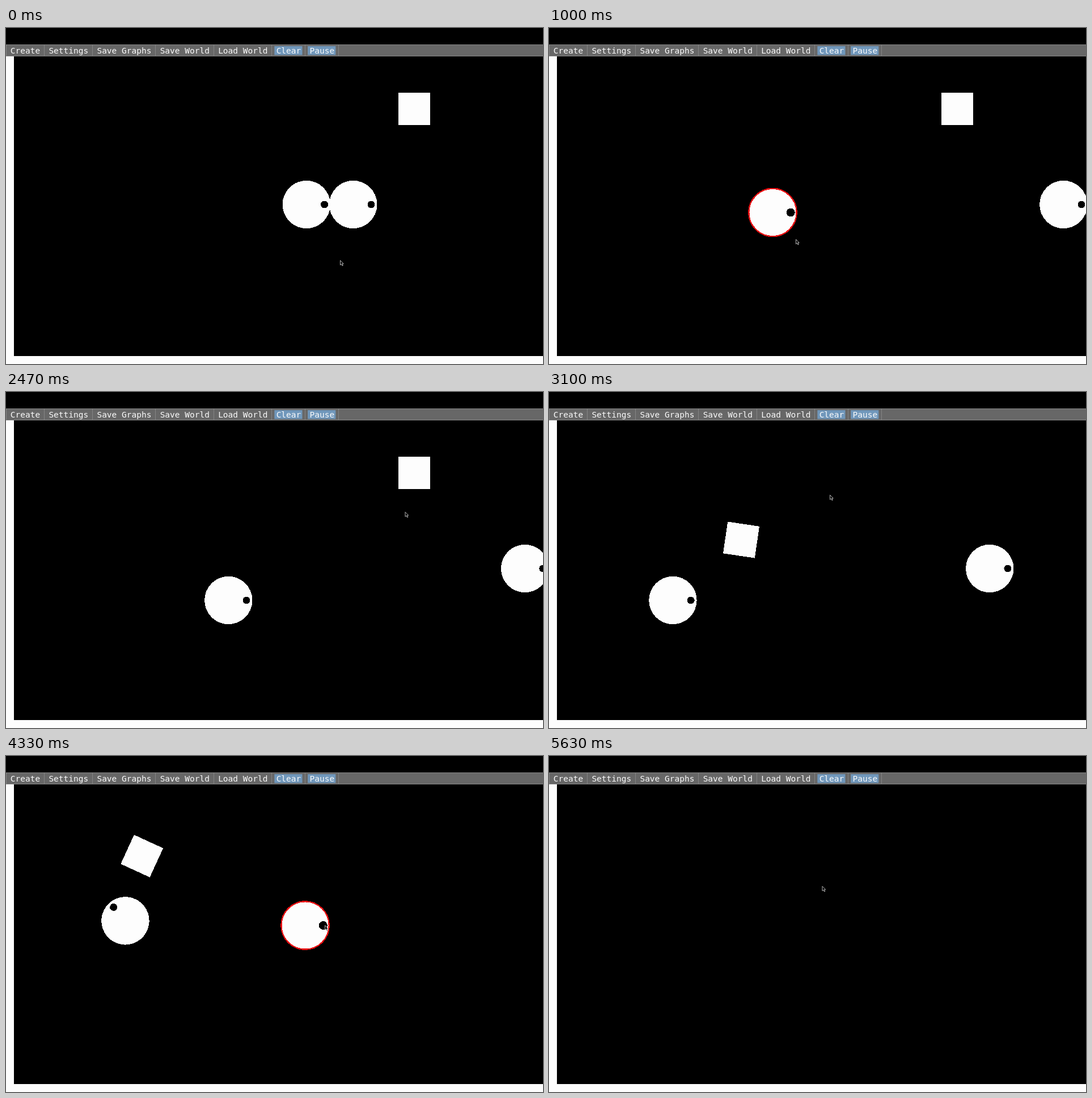
Write an HTML page that moves like this. It is 947 px wide and 592 px high and loops after 5.66 s.

```html
<!DOCTYPE html>
<html lang="en">
<head>
<meta charset="utf-8">
<title>Physics sandbox</title>
<style>
  html, body { margin: 0; width: 100%; height: 100%; overflow: hidden; background: #000; }
  svg { display: block; width: 947px; height: 592px; }
  .wall, .body { fill: #fdfdfd; shape-rendering: crispEdges; }
  .pupil { fill: #000; }
  .bar { fill: #676767; }
  .line { stroke: #858585; shape-rendering: crispEdges; }
  .button { fill: #7097bb; }
  text { font: 14.5px "DejaVu Sans Mono", monospace; fill: #fafafa; }
  .held .shape { stroke: #e80f12; stroke-width: 2.4; }
  .held .pupil { r: 7.5px; }
  .cursor { fill: #000; stroke: #c4c4c4; stroke-width: .9; }
</style>
</head>
<body>
<svg viewBox="0 0 947 592">
  <path class="wall" d="M0 50H14V578H947V592H0Z"/>
  <g id="world">
    <g id="left" class="body">
      <circle class="shape" r="42.2"/><circle class="pupil" cx="31.7" r="6.5"/>
    </g>
    <g id="right" class="body">
      <circle class="shape" r="42.2"/><circle class="pupil" cx="31.7" r="6.5"/>
    </g>
    <g id="box" class="body"><rect class="shape" x="-28.2" y="-28.2" width="56.4" height="56.4"/></g>
  </g>
  <g id="menu">
    <rect class="bar" y="29" width="947" height="21"/>
    <path class="line" d="M0 29.5H947M0 49.5H947M.5 30V49"/>
  </g>
  <path id="cursor" class="cursor" d="M.5 .5V8.6L2.5 6.9L4 10L5.3 9.4L3.9 6.3H6.2Z"/>
</svg>
<script>
const LOOP = 5660, CLEARED = 5060;
const ROOM = { left: 14, top: 50, right: 1138.5, bottom: 578 };
const RESTITUTION = .742;
const $ = id => document.getElementById(id);

function add(parent, tag, attrs, text = '') {
  const el = document.createElementNS('http://www.w3.org/2000/svg', tag);
  for (const key in attrs) el.setAttribute(key, attrs[key]);
  el.textContent = text;
  parent.append(el);
}

function buildMenu() {
  const labels = ['Create', 'Settings', 'Save Graphs', 'Save World', 'Load World', 'Clear', 'Pause'];
  let x = 0;
  for (const label of labels) {
    const width = label.length * 8.73;
    if (label === 'Clear' || label === 'Pause')
      add($('menu'), 'rect', { class: 'button', x: x + 4.5, y: 32, width: width + 5.5, height: 15.5 });
    add($('menu'), 'text', { x: x + 7.8, y: 45 }, label);
    x += width + 15.2;
    add($('menu'), 'path', { class: 'line', d: `M${Math.floor(x) + .5} 30V49` });
  }
}

// Straight flight between two walls, losing speed at each impact.
function bounce(p, v, dt, lo, hi) {
  if (!v) return p;
  const wall = v > 0 ? hi : lo, hit = (wall - p) / v;
  return dt <= hit ? p + v * dt : bounce(wall, -v * RESTITUTION, dt - hit, lo, hi);
}

const curve = (a, b, c, u) => a * (1 - u) ** 2 + 2 * b * u * (1 - u) + c * u * u;

const fly = (until, vx, vy, spin = 0) => ({
  until,
  move: ({ x, y, angle }, dt, span, r) => ({
    x: bounce(x, vx, dt, ROOM.left + r, ROOM.right - r),
    y: bounce(y, vy, dt, ROOM.top + r, ROOM.bottom - r),
    angle: angle + spin * dt
  })
});

const drag = (until, [bx, by], [cx, cy], spin = 0) => ({
  until, held: true,
  move: ({ x, y, angle }, dt, span) => ({
    x: curve(x, bx, cx, dt / span),
    y: curve(y, by, cy, dt / span),
    angle: angle + spin * dt
  })
});

// Each leg starts where the one before it ended.
const bodies = [
  { el: $('left'), r: 42, x: 530, y: 311, legs: [
    fly(800, -.1625, 0),
    drag(1470, [370, 328], [478.5, 387]),
    drag(2000, [595, 367], [522.3, 367]),
    fly(3200, -.276, 0),
    fly(3530, -.605, .241, .517),
    fly(4700, .133, .525, .073),
    fly(LOOP, -.05, .2, .073)] },
  { el: $('right'), r: 42, x: 612, y: 311, legs: [
    fly(4210, .295, 0),
    drag(LOOP, [480, 230], [740, 295])] },
  { el: $('box'), r: 38, x: 719.8, y: 142.3, legs: [
    fly(2600, 0, 0),
    drag(2940, [700, 165], [500, 172], .0168),
    fly(3200, -1, .55, .0168),
    fly(3530, -.3115, .189, .0168),
    fly(4700, .128, -.251, .0113),
    fly(LOOP, .2, .14, .03)] }
];

function pose({ x, y, r, legs }, t) {
  let state = { x, y, angle: 0 }, from = 0;
  for (const leg of legs) {
    state = leg.move(state, Math.min(t, leg.until) - from, leg.until - from, r);
    if (t < leg.until) return { ...state, held: leg.held };
    from = leg.until;
  }
  return state;
}

// Pointer stops: time, x, y
const stops = [
  [0, 589, 409], [1000, 435, 372], [1470, 586, 376], [2470, 703.5, 211], [2600, 715, 150],
  [2940, 500, 172], [3630, 464, 237], [4330, 562, 298], [4500, 764, 285], [5040, 498, 41],
  [5330, 481.5, 229]
];

function pointerAt(t) {
  const i = stops.findIndex(stop => stop[0] > t);
  if (i < 0) return stops[stops.length - 1].slice(1);
  const [t0, x0, y0] = stops[i - 1], [t1, x1, y1] = stops[i];
  const p = (t - t0) / (t1 - t0), eased = p * p * (3 - 2 * p);
  return [x0 + (x1 - x0) * eased, y0 + (y1 - y0) * eased];
}

function draw(t) {
  $('world').setAttribute('visibility', t < CLEARED ? 'visible' : 'hidden');
  for (const body of bodies) {
    const { x, y, angle, held } = pose(body, t);
    body.el.setAttribute('transform', `translate(${x} ${y}) rotate(${angle})`);
    body.el.classList.toggle('held', !!held);
  }
  $('cursor').setAttribute('transform', `translate(${pointerAt(t)})`);
}

buildMenu();
const start = performance.now();
function tick() {
  draw((performance.now() - start) % LOOP);
  requestAnimationFrame(tick);
}
tick();
</script>
</body>
</html>
```
